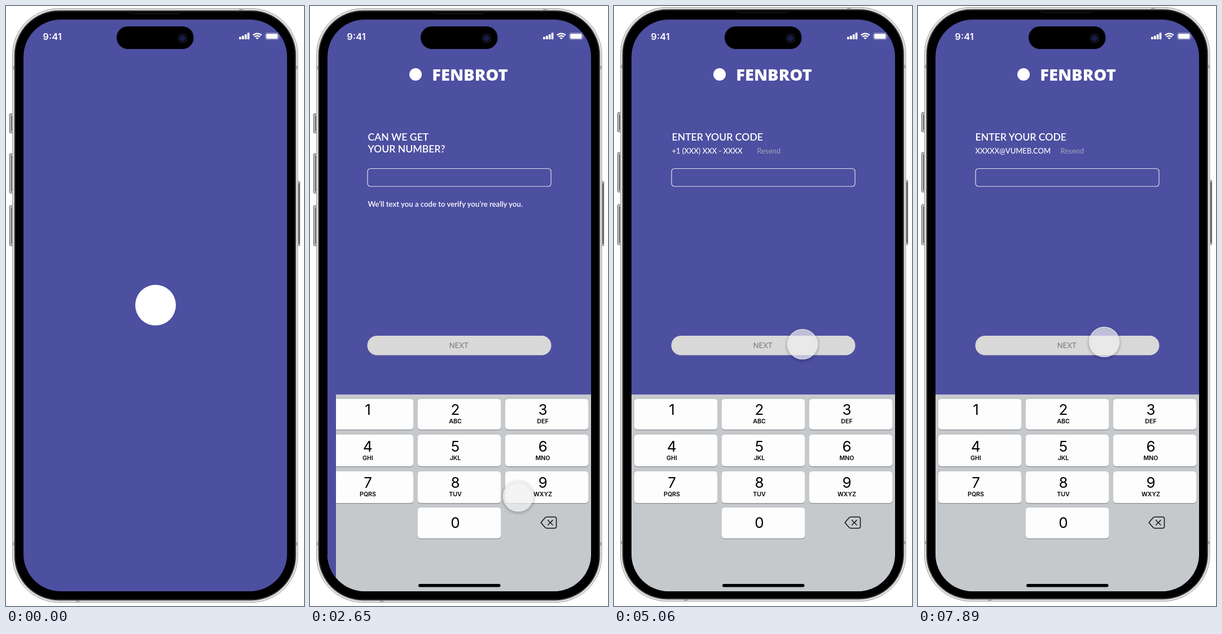
Write an HTML page that moves like this. It is 528 px wide and 1061 px high and loops after 8 s.

```html
<!DOCTYPE html>
<html lang="en">
<head>
<meta charset="utf-8">
<title>Sign-up flow</title>
<style>
  html, body { margin: 0; width: 100%; height: 100%; overflow: hidden; background: #fff; }
  svg { display: block; width: 100%; height: 100%; }
  .lato { font-family: Lato, sans-serif; font-weight: 600; fill: #fff; }
  .open { font-family: "Open Sans", sans-serif; font-weight: 800; fill: #fff; }
  .inter { font-family: Inter, sans-serif; fill: #000; }
</style>
</head>
<body>
<svg id="stage" viewBox="0 0 528 1061"></svg>
<script>
const LOOP = 8000, WIDTH = 467;
const BLUE = '#4d4fa1', GREY = '#c6c9cc', KEY = '#fdfdfe', DIM_KEY = '#abb1bb';
const BRAND = 'FENBROT';

const rect = (x, y, w, h, r, fill, extra = '') =>
  `<rect x="${x}" y="${y}" width="${w}" height="${h}" rx="${r}" fill="${fill}" ${extra}/>`;
const circle = (x, y, r, fill) => `<circle cx="${x}" cy="${y}" r="${r}" fill="${fill}"/>`;
const line = (d, color, width) =>
  `<path d="${d}" fill="none" stroke="${color}" stroke-width="${width}" stroke-linecap="round" stroke-linejoin="round"/>`;
const text = (font, size, x, y, str, extra = '') =>
  `<text class="${font}" font-size="${size}" x="${x}" y="${y}" ${extra}>${str}</text>`;
const mid = (font, size, x, y, str, extra = '') =>
  text(font, size, x, y, str, 'text-anchor="middle" ' + extra);

// Phone body
function chassis() {
  const sideKey = (x, y, h) =>
    rect(x, y, 5, h, 1.5, '#c9c9c9', 'stroke="#555" stroke-width="1"') +
    rect(x + 2.5, y + 3, 1.5, h - 6, 0.5, '#4a4a4a');
  const bands = [[413, 4, 7, 5], [124, 1050, 6, 5], [11, 106, 5, 6], [11, 948, 5, 6], [512, 106, 5, 6], [512, 948, 5, 6]];
  return sideKey(6.5, 190.5, 34) + sideKey(6.5, 261, 70) + sideKey(6.5, 353, 71) + sideKey(515.5, 310.5, 113) +
    rect(11.5, 4.5, 505.5, 1050, 82, '#e4e4e2', 'stroke="#9a9a9a" stroke-width="1"') +
    bands.map(b => rect(...b, 0, '#a9a9a9')).join('') +
    rect(15, 8, 498.5, 1043, 79, '#000', 'stroke="#777" stroke-width="1.4"') +
    rect(17, 10, 494.5, 1039, 77, '#000', 'stroke="#1d1d1d" stroke-width="1"') +
    line('M217 10.5q2 3 6 3h83q4 0 6-3', '#222', 1);
}

function island() {
  return rect(196, 36, 136.5, 40, 20, '#000') +
    circle(312.5, 57, 10, '#0b0b12') + circle(312.5, 57, 6, '#10122c') +
    [[312.5, 54], [312.5, 60], [309.5, 57], [315.5, 57]].map(p => circle(...p, 1.5, '#262c78')).join('');
}

function status() {
  const bars = [4.5, 6.5, 9, 12].map((h, i) => rect(413 + i * 4.9, 59 - h, 3.7, h, 1, '#fff')).join('');
  return mid('inter', 16.5, 82, 60, '9:41', 'font-weight="600" style="fill:#fff"') + bars +
    `<g fill="none" stroke="#fff" stroke-width="2.3">
      <path d="M437.6 51.6a11 11 0 0 1 15.2 0"/><path d="M440.4 54.6a7 7 0 0 1 9.6 0"/></g>
    <path d="M442.7 56.6a3.8 3.8 0 0 1 5 0l-2.5 2.6z" fill="#fff"/>` +
    rect(459.5, 47.5, 23.5, 12, 3.5, 'none', 'stroke="#fff" stroke-opacity=".45"') +
    rect(461, 49, 20.5, 9, 2, '#fff') +
    '<path d="M484 51.5q2 2 0 4z" fill="#fff" opacity=".5"/>';
}

const header = () => circle(187, 121, 11, '#fff') + mid('open', 29, 283.5, 131.7, BRAND);

function backspace(x, y, s) {
  return `<g transform="translate(${x} ${y}) scale(${s})">` +
    line('M-13.5 0L-6-8.5Q-4.7-10-3-10H10.5Q14-10 14-6.500V6.500Q14 10 10.5 10H-3Q-4.700 10-6 8.500Z', '#111', 1.5) +
    line('M-1-4.300L7.500 4.300M7.500-4.300L-1 4.300', '#111', 1.5) + '</g>';
}

const key = (x, y, w, h, fill = KEY) => rect(x, y + 1.3, w, h, 5, '#898c90') + rect(x, y, w, h, 5, fill);
const tray = () => rect(31, 687, WIDTH, 350, 0, GREY) + rect(192, 1022, 145.5, 5.5, 2.7, '#000');

function numPad() {
  const labels = ['', 'ABC', 'DEF', 'GHI', 'JKL', 'MNO', 'PQRS', 'TUV', 'WXYZ'];
  const rows = [695, 758, 823];
  const keys = labels.map((label, i) => {
    const x = 36 + (i % 3) * 155, row = Math.floor(i / 3), y = rows[row];
    const base = 723 + row * 64.5;
    return key(x, y, 147, row ? 56 : 54) + mid('inter', 26, x + 66.5, base, i + 1) +
      mid('inter', 10.6, x + 66.5, base + 15, label, 'font-weight="600"');
  }).join('');
  return tray() + keys + key(191, 887, 147, 54.5) + mid('inter', 26, 257.5, 922.5, '0') + backspace(422.5, 913.5, 1);
}

function letterPad() {
  const row = (str, x0, y) => [...str].map((c, i) => {
    const x = x0 + i * 42.4;
    return key(x, y, 35.3, 45) + mid('inter', 22.5, x + 17.6, y + 30.7, c);
  }).join('');
  return tray() + row('QWERTYUIOP', 56, 698) + row('ASDFGHJKL', 77, 756.5) + row('ZXCVBNM', 119, 815) +
    key(56, 815, 47.5, 45) + '<path d="M79.500 827.500L91 838.500H85.500V846H73.500V838.500H68Z" fill="#000"/>' +
    key(425, 815, 48, 45, DIM_KEY) + backspace(448.5, 837.7, 0.88) +
    key(56, 873.5, 98.5, 45, DIM_KEY) + mid('inter', 16.5, 105, 902.5, '123') +
    key(161.5, 873.5, 206, 45) + mid('inter', 16.5, 264, 902.5, 'space') +
    key(374, 873.5, 99, 45, DIM_KEY) + mid('inter', 16.5, 423.5, 902.5, 'return') +
    rect(424.5, 958.5, 8.5, 19, 4.2, 'none', 'stroke="#55585c" stroke-width="1.8"') +
    line('M419.500 970v3a9.300 9.300 0 0 0 18.600 0v-3M428.800 982.500v6M424 988.500h9.600', '#55585c', 1.8);
}

const form = () => header() +
  rect(102, 287.5, 325, 31.5, 5, 'none', 'stroke="#e2e2f0" stroke-width="1.2"') +
  rect(101.5, 583, 326, 34.5, 17.2, '#d8d8d8') +
  mid('lato', 13.2, 263.5, 605, 'NEXT', 'style="fill:#808080;font-weight:500"');

const askFor = (x, thing, verb) => form() +
  text('lato', 17.6, x, 238, 'CAN WE GET') + text('lato', 17.6, x, 258.5, `YOUR ${thing}?`) +
  text('lato', 13.2, x, 355.3, `We’ll ${verb} you a code to verify you’re really you.`);

const enterCode = (x, dest) => form() + text('lato', 17.6, x, 238, 'ENTER YOUR CODE') +
  text('lato', 13, x, 260.5, dest, 'style="font-weight:500"') +
  text('lato', 13, x + 151, 260.5, 'Resend', 'style="fill:#a5a6b8;font-weight:400"');

const pill = (x, y, label) => rect(x, y, 326, 34.5, 17.2, '#2e3061') + mid('lato', 13.2, 263, y + 22, label);

const welcome = () => header() +
  `<g opacity=".62">${mid('open', 14.9, 264, 234.7, 'TRADE, SHARE, SMILE')}${
    mid('open', 14.9, 264, 262, BRAND + ' MAKES IT ALL POSSIBLE')}</g>` +
  mid('lato', 13.2, 261, 825, 'By tapping ‘Sign in’ you agree to our terms.') +
  pill(99, 854.3, 'CREATE ACCOUNT') + pill(100, 902, 'SIGN IN') +
  mid('lato', 13.2, 260.5, 975.7, 'Trouble signing in?');

const screens = [
  circle(265, 529, 36, '#fff'),
  welcome(),
  askFor(102.5, 'NUMBER', 'text') + numPad(),
  enterCode(102.5, '+1 (XXX) XXX - XXXX') + numPad(),
  askFor(101.5, 'E-MAIL', 'send') + letterPad(),
  enterCode(101.5, 'XXXXX@VUMEB.COM') + numPad()
];

const stage = document.getElementById('stage');
stage.innerHTML = `
  <defs>
    <clipPath id="glass"><rect x="31" y="24" width="467" height="1011" rx="66"/></clipPath>
    <filter id="soft" x="-30%" y="-30%" width="160%" height="160%"><feGaussianBlur stdDeviation="2"/></filter>
  </defs>
  <g id="body">${chassis()}</g>
  <g clip-path="url(#glass)">
    ${rect(31, 24, WIDTH, 1011, 0, BLUE)}
    ${screens.map(s => `<g class="screen">${status()}${s}</g>`).join('')}
    <rect id="strip" x="31" y="687" width="15" height="350" fill="${BLUE}"/>
  </g>
  ${island()}
  <g id="touch">
    <circle cy="2" r="27" fill="none" stroke="#000" stroke-width="2.5" opacity=".3" filter="url(#soft)"/>
    <circle r="26.300" fill="#f1f1f2" fill-opacity=".7" stroke="#fff" stroke-opacity=".65" stroke-width="1.600"/>
  </g>`;

const body = document.getElementById('body');
const strip = document.getElementById('strip');
const touch = document.getElementById('touch');
const layers = [...stage.querySelectorAll('.screen')];

// Push transitions: start, duration
const pushes = [[900, 250], [2400, 240], [4170, 320], [5600, 320], [7140, 330]];
// Touch path: time, x, y
const path = [
  [1390, 470, 790], [1780, 392, 853], [2020, 382, 866], [2420, 382, 866], [2650, 369, 867],
  [3000, 356, 800], [3210, 344, 705], [3370, 336, 645], [3850, 336, 645], [3860, 330, 593],
  [4650, 330, 593], [4900, 333, 597], [5060, 334, 598], [6430, 334, 598], [6500, 331, 596],
  [6900, 331, 596], [6910, 329, 594], [7880, 329, 594], [7890, 330, 594]
];

const clamp = v => Math.max(0, Math.min(1, v));
const easeOut = p => 1 - (1 - p) ** 3;

function pointAt(t) {
  const next = path.findIndex(p => p[0] > t);
  if (next === 0) return path[0].slice(1);
  if (next < 0) return path[path.length - 1].slice(1);
  const [a, b] = [path[next - 1], path[next]];
  const p = (t - a[0]) / (b[0] - a[0]);
  return [a[1] + (b[1] - a[1]) * p, a[2] + (b[2] - a[2]) * p];
}

function render(t) {
  const pos = pushes.reduce((sum, [start, len]) => sum + easeOut(clamp((t - start) / len)), 0);
  layers.forEach((layer, i) => {
    const off = i - pos;
    layer.style.display = Math.abs(off) < 1 ? '' : 'none';
    layer.setAttribute('transform', `translate(${off * WIDTH} 0)`);
  });
  strip.style.display = t >= 2630 && t < 2730 ? '' : 'none';
  body.setAttribute('transform', `translate(0 ${-2 * clamp((t - 4650) / 250)})`);
  const [x, y] = pointAt(t);
  touch.setAttribute('transform', `translate(${x} ${y})`);
  touch.setAttribute('opacity', clamp((t - 1380) / 160));
}

const begin = performance.now();
function tick() {
  render((performance.now() - begin) % LOOP);
  requestAnimationFrame(tick);
}
render(0);
requestAnimationFrame(tick);
</script>
</body>
</html>
```
